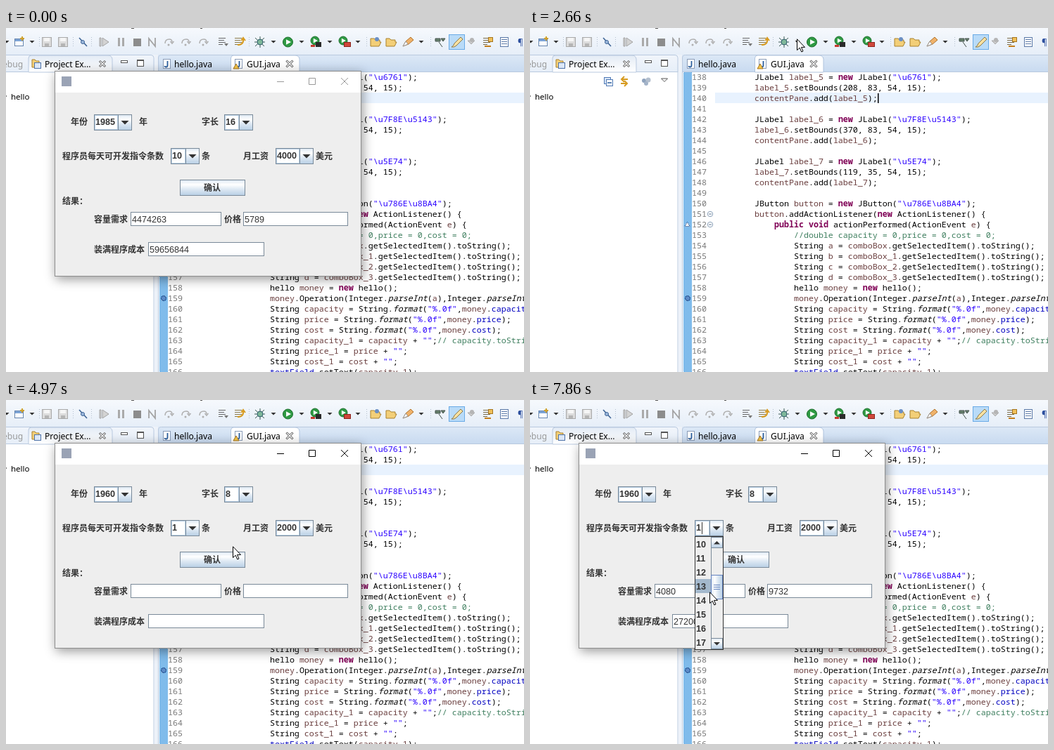
Animation of 736 by 490 pixels, one loop 8000 ms. Source, as an HTML page:

```html
<!DOCTYPE html>
<html lang="zh">
<head>
<meta charset="utf-8">
<title>GUI.java</title>
<style>
html, body { margin: 0; width: 736px; height: 490px; overflow: hidden; background: #fff; }
body { position: relative; }
pre, .ruler, .row, svg { position: absolute; margin: 0; }
pre { top: 62px; font: 11.667px/15px "Noto Sans Mono", monospace; color: #000; }
#code { left: 263px; }
#nums { left: 230px; color: #787878; }
.row { left: 263px; top: 92px; width: 473px; height: 15px; background: #e8f2fe; }
.ruler { left: 218px; top: 63px; width: 12px; height: 427px;
  background: repeating-conic-gradient(#0078d7 0 25%, #fff 0 50%) 0 0 / 2px 2px; }
.kw { color: #7f0055; font-weight: 600; }
.str { color: #2a00ff; }
.com { color: #3f7f5f; }
.var { color: #6a3e3e; }
.field { color: #0000c0; }
.static { font-style: italic; }
svg { left: 0; top: 0; }
svg text { white-space: pre; }
.ui { font: 12.1px "Noto Sans", sans-serif; }
.zh { font: bold 12px "Noto Sans CJK SC", "Noto Sans CJK", sans-serif; fill: #333; }
.num { font: 12.6px "Liberation Sans", sans-serif; fill: #333; }
.b { font-weight: bold; }
#win { transform-origin: 287px 208px; filter: drop-shadow(2px 4px 8px rgba(0, 0, 0, .4)); }
#tip { filter: drop-shadow(2px 2px 1.5px rgba(0, 0, 0, .35)); }
</style>
</head>
<body>
<div class="row"></div>
<div class="ruler"></div>
<pre id="nums"></pre>
<pre id="code">
        JLabel label_5 = new JLabel("\u6761");
        label_5.setBounds(208, 83, 54, 15);
        contentPane.add(label_5);

        JLabel label_6 = new JLabel("\u7F8E\u5143");
        label_6.setBounds(370, 83, 54, 15);
        contentPane.add(label_6);

        JLabel label_7 = new JLabel("\u5E74");
        label_7.setBounds(119, 35, 54, 15);
        contentPane.add(label_7);

        JButton button = new JButton("\u786E\u8BA4");
        button.addActionListener(new ActionListener() {
            public void actionPerformed(ActionEvent e) {
                //double capacity = 0,price = 0,cost = 0;
                String a = comboBox.getSelectedItem().toString();
                String b = comboBox_1.getSelectedItem().toString();
                String c = comboBox_2.getSelectedItem().toString();
                String d = comboBox_3.getSelectedItem().toString();
                hello money = new hello();
                money.Operation(Integer.parseInt(a),Integer.parseInt(b));
                String capacity = String.format("%.0f",money.capacity);
                String price = String.format("%.0f",money.price);
                String cost = String.format("%.0f",money.cost);
                String capacity_1 = capacity + "";// capacity.toString();
                String price_1 = price + "";
                String cost_1 = cost + "";
                textField.setText(capacity_1);
</pre>
<svg id="stage" width="736" height="490" viewBox="0 0 736 490"></svg>
<script>
const LOOP = 8000, STEP = 78;
const $ = id => document.getElementById(id);

// ---- code colouring
const token = /(?<com>\/\/.*)|(?<str>"[^"]*")|\b(?:(?<kw>new|public|void)|(?<static>parseInt|format)|(?<field>(?<=money\.)[a-z]+\b(?!\()|textField)|(?<var>label_\d|contentPane|button|comboBox(?:_\d)?|money|(?:capacity|price|cost)(?:_1)?|[a-e]))\b/g;
$('code').innerHTML = $('code').textContent.replace(token, (...m) => {
  const [kind] = Object.entries(m.at(-1)).find(([, v]) => v !== undefined);
  return `<span class="${kind}">${m[0]}</span>`;
});
$('nums').textContent = Array.from({ length: 29 }, (_, i) => 138 + i).join('\n');

// ---- drawing helpers
const rect = (x, y, w, h, fill, more = '') =>
  `<rect x="${x}" y="${y}" width="${w}" height="${h}" fill="${fill}" ${more}/>`;
const frame = (x, y, w, h, fill, line = '#7a8a99', more = '') =>
  rect(x + .5, y + .5, w - 1, h - 1, fill, `stroke="${line}" ${more}`);
const path = (d, fill, line = 'none', w = 1, more = '') =>
  `<path d="${d}" fill="${fill}" stroke="${line}" stroke-width="${w}" ${more}/>`;
const disc = (x, y, r, fill, line = 'none') =>
  `<circle cx="${x}" cy="${y}" r="${r}" fill="${fill}" stroke="${line}"/>`;
const text = (x, y, s, cls, more = '') => `<text x="${x}" y="${y}" class="${cls}" ${more}>${s}</text>`;
const group = (id, body) => `<g id="${id}">${body}</g>`;
const grad = (id, end, ...stops) => `<linearGradient id="${id}" ${end}>${stops.map(([o, c]) =>
  `<stop offset="${o}" stop-color="${c}"/>`).join('')}</linearGradient>`;
const down = (x, y, w, fill = '#333') => path(`M${x - w} ${y}h${2 * w}l${-w} ${w}z`, fill);
const cross = (x, y, r, line, w = 1) =>
  path(`M${x - r} ${y - r}l${2 * r} ${2 * r}m0 ${-2 * r}l${-2 * r} ${2 * r}`, 'none', line, w);

// ---- IDE
const floppy = x => frame(x - 7, 13, 14, 14, '#dcdcdc', '#a9a9a9') + rect(x - 4, 14, 8, 5, '#f6f6f6') + rect(x - 3, 22, 6, 4, '#b5b5b5');
const page = (x, y) => frame(x - 5, y - 7, 11, 14, '#fff', '#8a9cb8') +
  path(`M${x + 1.5} ${y - 4}v6q0 2.5-2 2.5t-2-1.5`, 'none', '#2c5f9e', 1.8);
const folder = x => path(`M${x - 7} 26V15h5l2 2h6v3h2l-3 6z`, '#f3cf78', '#a9812c');
const stepOver = x => path(`M${x - 6} 22q0-6 6-6q4 0 4 4m-2.5-1l2.5 3 2.5-3`, 'none', '#b0b0b0', 1.5) + disc(x - 1, 24, 1.5, '#b0b0b0');
const bars = (x, c) => path(`M${x - 6} 14.500h10m-10 3h8m-8 3h10m-10 3h6`, 'none', c);
const play = (x, y, r) => disc(x, y, r, '#2f9a43', '#1d6f2e') + path(`M${x - r * .35} ${y - r * .55}v${r * 1.1}l${r} ${-r * .55}z`, '#fff');

const toolbar = rect(0, 0, 736, 38, 'url(#bar)') +
  path('M178 .5h4M276 .5h3', 'none', '#555') +
  [1, 37, 380, 420, 460, 500, 590].map(x => down(x, 18, 3.5)).join('') +
  [47, 95, 121, 345, 512, 603].map(x => path(`M${x}.5 13v15`, 'none', '#b5c0cf', 1, 'stroke-dasharray="1 2"')).join('') +
  frame(12, 15, 13, 11, '#fff', '#6685ae') + rect(13, 16, 11, 3, '#7ba3d6') + path('M23 12v6m-3-3h6', 'none', '#d0a02c', 2) +
  floppy(58) + floppy(81) +
  path('M104 14l11 12', 'none', '#3e6496', 1.6) + disc(109, 20, 2.5, '#9db9dd', '#3e6496') +
  path('M133 14h2v12h-2zM137 14v12l9-6z', '#d3d3d3', '#a3a3a3') +
  rect(159, 14, 3, 12, '#aaa') + rect(165, 14, 3, 12, '#aaa') +
  rect(181, 15, 11, 11, '#8c8c8c') + path('M203 26V15l9 11V14', 'none', '#a3a3a3', 1.8) +
  [232, 256, 281].map(stepOver).join('') +
  bars(308, '#666') + path('M310 22h6l-3 4z', '#777') +
  bars(331, '#8b7a4a') + path('M329 24q9 0 8-8m-3 2l3-4 3 4', 'none', '#d79b20', 2) +
  path('M354 14l13 12m0-12l-13 12m-1-6h15m-7-8v16', 'none', '#3d5a55') + disc(361, 20, 4, '#7fb89a', '#2e5d6c') +
  group('hover', frame(390, 10, 21, 21, '#d5e8fa', '#8abbe8')) + play(400.5, 20, 7) +
  play(439, 18, 6) + rect(440, 20, 8, 7, '#2b2b2b') + rect(433, 24, 6, 3, '#c53a2f') +
  play(479, 18, 6) + frame(480, 20, 10, 7, '#d0473b', '#8c241d') +
  folder(525) + disc(527, 16, 3, '#6b8fc4') + folder(547) +
  path('M564 26l4-7 7-6 4 4-7 6z', '#efb26a', '#b1722d') + path('M564 26l4-7 3 4z', '#fff', '#999') +
  path('M610 15h7v4h-7zM618 15h6l-3 4zM615 20l5 7', '#66806c', '#42504a') +
  frame(629, 9, 23, 22, '#b9dbf8', '#6aabe6') + path('M633 27q3-1 4-5l9-9 3 3-9 9q-3 3-7 2z', '#f7e0a0', '#8d7a4a') +
  path('M656 18h10l-5 5z', '#ccc', '#aaa') + disc(662, 17, 3, '#b5b5b5') +
  bars(684, '#7a6a48') + frame(685, 13, 7, 7, '#f0c05a', '#a5751e') + path('M680 26h9', 'none', '#c57f1c', 2) +
  frame(702, 13, 12, 14, '#fff', '#5b79a8') + path('M704 16.500h8m-8 3h8m-8 3h8', 'none', '#5b79a8') +
  text(727, 25, '¶', 'ui', 'fill="#2c4f9e" font-weight="bold"');

const tabs = rect(0, 38, 211, 25, 'url(#left)') + rect(211, 38, 5, 452, '#edf2f9') + rect(216, 38, 520, 25, 'url(#strip)') +
  path('M0 38.5H206q4 0 4 4V490M216.5 490V43q0-4.500 4-4.500H736M0 62.5H210M217 62.5H736', 'none', '#b9c9df') +
  path('M32 63V43q0-4 4-4H145q5 0 6 5V63z', 'url(#tab)', '#b9c9df') +
  path('M319.500 63V43q0-4 4-4H411q5 0 6 5V63z', '#fff', '#b0c4de') +
  text(-5, 56, 'ebug', 'ui', 'fill="#999"') + text(55, 56, 'Project Ex...', 'ui') +
  path('M37 56V45h4l2 2h4v9z', '#f3cf78', '#a9812c') + frame(40, 49, 10, 9, '#dbe7f7', '#4f73a8') +
  cross(137, 51, 4, '#555', 3) + cross(137, 51, 3.5, '#fff', 1.2) +
  frame(163, 46, 10, 4, '#fff', '#555') + frame(186, 45, 10, 10, '#fff', '#555') + rect(186, 45, 10, 2, '#555') +
  page(228, 51) + text(239, 56, 'hello.java', 'ui') +
  page(330, 51) + path('M323 58l4-7 4 7z', '#f5c64a', '#a5751e') + text(342, 56, 'GUI.java', 'ui') +
  cross(403, 51, 4.500, '#555', 3) + cross(403, 51, 4, '#fff', 1.2);

const pane = frame(105, 70, 10, 10, '#dce8f7', '#4f79b5') + frame(108, 73, 10, 10, '#fff', '#4f79b5') + path('M110 78h6', 'none', '#2c5f9e', 1.5) +
  path('M139 73h-8m3-4l-4 4 4 4M129 79h8m-3-4l4 4-4 4', 'none', '#d79b20', 2) +
  disc(162, 75, 3, '#8fa3bd') + disc(168, 74, 3.5, '#b4bfce') + disc(165, 79, 3, '#a3b3c8') +
  path('M186.500 72h9l-4.500 4.500z', '#fff', '#555') +
  path('M-2 94l3 3-3 3', 'none', '#777') + text(7, 102, 'hello', 'ui', 'style="font-size:11.5px"');

const marks = path('M220 282.500l3.500-6 3.500 6z', '#fff', '#6a86b0') + disc(224, 385, 3.5, '#5d8cc9', '#234f8c') +
  [265, 280].map(y => disc(256, y, 3.7, '#fff', '#8aa0b8') + path(`M254 ${y}h4`, 'none', '#5f7896')).join('') +
  group('caret', rect(494, 93, 1.5, 14, '#000'));

const tip = group('tip', frame(404, 58, 149, 22, '#fff', '#767676') +
  text(410, 74, 'hello/src/hello/GUI.java', 'ui', 'fill="#575757" style="font-size:12.3px"'));

// ---- application window
const label = (x, y, s) => text(x, y + 4.500, s, 'zh');
const combo = (x, y, w, id) => frame(x, y, w, 23, '#fff') + frame(x + 1, y + 1, w - 21, 21, '#fff', '#b8cfe5') +
  frame(x + w - 20, y, 20, 23, 'url(#metal)') +
  down(x + w - 10, y + 9, 5.5) + text(x + 2, y + 15, '', 'num b', `id="${id}"`);
const field = (x, y, w, id) => frame(x, y, w, 20, '#fff') + text(x + 2, y + 15, '', 'num', `id="${id}"`);

const win = group('win', rect(69, 61, 436, 293, '#8d8d8d') + rect(70, 62, 434, 30, '#fff') + rect(70, 92, 434, 261, '#eee') +
  rect(79, 69, 14, 14, '#9aa3b5') +
  `<g id="buttons">${path('M385 76.500h10M430.500 71.500h9v9h-9z', 'none', 'currentColor')}${cross(481, 76, 5, 'currentColor')}</g>` +
  label(92, 133, '年份') + combo(125, 123, 54, 'year') + label(189, 133, '年') +
  label(278, 133, '字长') + combo(310, 123, 41, 'bits') +
  label(80, 182, '程序员每天可开发指令条数') + combo(234, 171, 41, 'rate') + label(278, 182, '条') +
  label(337, 182, '月工资') + combo(383, 171, 54, 'pay') + label(440, 182, '美元') +
  frame(247, 216, 93, 23, 'url(#metal)', '#7a8a99', 'id="ok"') + label(281, 227, '确认') +
  group('focus', frame(280, 218, 26, 18, 'none', '#a3b8cc')) +
  label(80, 246, '结果：') + label(125, 272, '容量需求') + field(177, 262, 129, 'cap') +
  label(310, 272, '价格') + field(337, 262, 149, 'price') +
  label(125, 315, '装满程序成本') + field(202, 305, 165, 'cost') +
  group('yearCaret', rect(156, 126, 1, 17, '#333')) + group('rateCaret', rect(244, 174, 1, 17, '#333')));

const rows = [0, 1, 2, 3, 4, 5, 6, 7];
const popup = group('popup', frame(234, 194, 41, 162, '#eee', '#333') +
  rect(235, 195, 22, 20, '#a3b8cc', 'id="pick"') +
  rows.map(i => text(236, 209.5 + 20 * i, '', 'num b', `id="item${i}"`)).join('') +
  rect(257, 195, 17, 160, '#eee') + path('M257.500 195v160', 'none', '#7a8a99') +
  frame(257, 195, 17, 16, 'url(#metal)') + path('M261 205.500l4.500-4.500 4.500 4.500z', '#333') +
  frame(257, 339, 17, 16, 'url(#metal)') + down(265.5, 345, 4.5) +
  group('thumb', frame(257, 211, 17, 35, 'url(#metalAcross)', '#6382bf') +
    path('M261 225.500h9m-9 3h9m-9 3h9', 'none', '#6382bf')));

const cursor = group('arrow', path('M.5 .8V16.600L4.200 13.200L6.800 19L9 18L6.500 12.400H11.500z', '#fff', '#000')) +
  group('beam', path('M-3-7.500h2.500q.5 0 .5 1V6.500q0 1-.5 1H-3M3-7.500H.5M3 7.500H.5', 'none', '#000'));

const V = 'x2="0" y2="1"', metal = [[0, '#dde8f3'], [.3, '#fff'], [.6, '#dde8f3'], [1, '#b8cfe5']];
$('stage').innerHTML = '<defs>' +
  grad('bar', V, [0, '#f6f9fd'], [1, '#e6eef8']) + grad('left', V, [0, '#f1f5fb'], [1, '#e6eef8']) +
  grad('strip', V, [0, '#dce8f6'], [1, '#c8daf0']) + grad('tab', V, [0, '#e3ebf5'], [1, '#fff']) +
  grad('metal', V, ...metal) + grad('metalAcross', 'x2="1" y2="0"', ...metal) +
  '</defs>' + toolbar + tabs + pane + marks + tip + win + popup + cursor;

// ---- timeline: [ms, x, y] of the pointer
const route = [
  [0, 650, 500], [1100, 650, 500], [1180, 646, 472], [1560, 404, 40], [1800, 402, 36], [1880, 402, 34],
  [1960, 402, 24], [2110, 398, 17], [2510, 397, 17], [2740, 345, 10], [3350, 372, 180], [3500, 376, 196],
  [3670, 376, 196], [3910, 402, 18], [4150, 402, 18], [4310, 378, 31], [4450, 371, 6], [4510, 371, 6],
  [4680, 354, 50], [4970, 322, 208], [5280, 296, 226], [5990, 296, 225], [6290, 266, 186], [6450, 266, 186],
  [6700, 263, 212], [7250, 256, 272], [7860, 255, 273], [LOOP, 255, 273]
];
function pointer(t) {
  const i = route.findIndex(p => p[0] > t);
  const [t0, x0, y0] = route[i - 1], [t1, x1, y1] = route[i];
  const k = Math.floor((t - t0) / STEP) * STEP / (t1 - t0);
  return [x0 + (x1 - x0) * k, y0 + (y1 - y0) * k].map(Math.round);
}

const show = (id, on) => $(id).setAttribute('visibility', on ? 'visible' : 'hidden');
const move = (id, x, y) => $(id).setAttribute('transform', `translate(${x} ${y})`);
const fill = values => Object.entries(values).forEach(([id, v]) => {
  if ($(id).textContent !== v) $(id).textContent = v;
});
const blink = (t, from, to) => t >= from && t < to && Math.floor((t - from) / 500) % 2 === 0;

const closing = { year: '1985', bits: '16', rate: '10', pay: '4000', cap: '4474263', price: '5789', cost: '59656844' };
const fresh = { year: '1960', bits: '8', rate: '1', pay: '2000', cap: '', price: '', cost: '' };
const solved = { ...fresh, cap: '4080', price: '9732', cost: '272000' };

function draw(t) {
  const [x, y] = pointer(t);
  const beam = t < 4230 && x > 262 && y > 63;
  show('arrow', !beam);
  show('beam', beam);
  move('arrow', x, y);
  move('beam', x - .5, y);
  show('hover', Math.abs(x - 400) < 11 && y > 9 && y < 31);
  show('tip', t >= 1720 && t < 2070);
  show('caret', blink(t, 2430, 4230));

  const first = t < 710;
  fill(first ? closing : t < 5600 ? fresh : solved);
  show('win', first || t >= 4230);
  const [alpha, scale] = t >= 4230 && t < 4310 ? [.45, .965] : t >= 4310 && t < 4370 ? [.84, .992] : [1, 1];
  $('win').style.opacity = alpha;
  $('win').style.transform = `scale(${scale})`;
  $('buttons').style.color = first ? '#999' : '#000';

  show('yearCaret', blink(t, 4310, 5450));
  show('rateCaret', blink(t, 6450, LOOP));
  show('focus', t >= 5450 && t < 6450);
  $('ok').setAttribute('fill', t >= 5450 && t < 5600 ? '#b8cfe5' : 'url(#metal)');

  show('popup', t >= 6450);
  const notch = Math.min(8, Math.max(0, Math.floor((t - 7310) / STEP) + 1));
  const top = Math.round(9 * notch / 8);
  fill(Object.fromEntries(rows.map(i => ['item' + i, String(top + i + 1)])));
  $('pick').setAttribute('y', 195 + 20 * Math.max(0, Math.floor((y - 195) / 20)));
  move('thumb', 0, Math.round(top * 128 / 30));
}

function tick() {
  draw(performance.now() % LOOP);
  requestAnimationFrame(tick);
}
tick();
</script>
</body>
</html>
```
